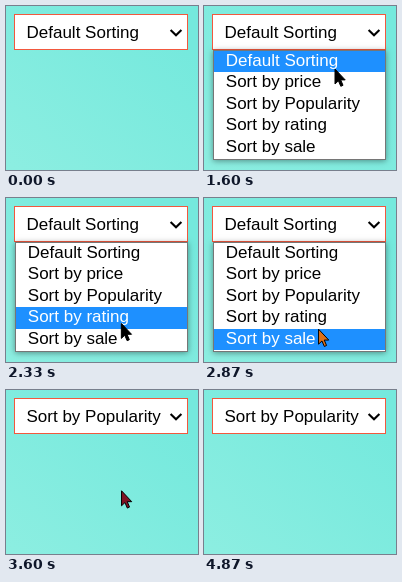
Animation of 192 by 164 pixels, one loop 4990 ms. Source, as an HTML page with a canvas:

```html
<!DOCTYPE html>
<html lang="en">
<head>
<meta charset="utf-8">
<title>Sorting select</title>
<style>
  html, body { margin: 0; width: 100%; height: 100%; overflow: hidden; }
  canvas { display: block; width: 192px; height: 164px; }
</style>
</head>
<body>
<canvas id="stage" width="192" height="164"></canvas>
<script>
const ctx = document.getElementById('stage').getContext('2d');
const LOOP = 4990, OPEN = 670, CLOSE = 3600;
const LIST_TOP = 45, ROW = 21.4;
const options = ['Default Sorting', 'Sort by price', 'Sort by Popularity', 'Sort by rating', 'Sort by sale'];
const arrow = [[0, 0], [0, 15], [3.4, 11.8], [5.8, 17.3], [8, 16.3], [5.7, 10.9], [10.2, 10.9]];

const smooth = p => p * p * (3 - 2 * p);
const easeIn = p => Math.pow(p, 1.6);
const mix = (a, b, p) => a + (b - a) * p;
const clamp = (v, lo, hi) => Math.min(hi, Math.max(lo, v));
const rowTop = i => Math.round(LIST_TOP + i * ROW);

// Pointer moves, each made in a number of visible steps
const start = { x: 190, y: 66 };
const moves = [
  { from: 70, to: 400, steps: 6, x: 170, y: 26, ease: smooth },
  { from: 1130, to: 1600, steps: 8, x: 131, y: 63, ease: smooth },
  { from: 1670, to: 2130, steps: 8, x: 115.5, y: 124, ease: smooth },
  { from: 2270, to: 2470, steps: 4, x: 114.5, y: 133, ease: smooth },
  { from: 2870, to: 3330, steps: 7, x: 115.5, y: 100, ease: smooth },
  { from: 3600, to: 4600, steps: 16, x: 119, y: 166, ease: easeIn }
];

function pointerAt(t) {
  let { x, y } = start;
  for (const m of moves) {
    if (t < m.from) break;
    const gap = (m.to - m.from) / (m.steps - 1);
    const step = Math.floor((t - m.from + 4) / gap) + 1;
    const p = m.ease(clamp(step / m.steps, 0, 1));
    x = mix(x, m.x, p);
    y = mix(y, m.y, p);
  }
  return { x, y };
}

function pointerColor(t) {
  if (t < 2870) return '#000';
  const p = clamp((t - 2870) / 460, 0, 1);
  const from = [222, 112, 24], to = [128, 20, 36];
  return `rgb(${from.map((v, i) => Math.round(mix(v, to[i], p)))})`;
}

function rect(x, y, w, h, color) {
  ctx.fillStyle = color;
  ctx.fillRect(x, y, w, h);
}

function label(text, x, y, color) {
  ctx.font = '17px "Liberation Sans", Arial, sans-serif';
  ctx.fillStyle = color;
  ctx.fillText(text, x, y);
}

function trace(points) {
  ctx.beginPath();
  points.forEach(([x, y]) => ctx.lineTo(x, y));
}

function drawBackground() {
  const g = ctx.createLinearGradient(10, 164, 150, 10);
  g.addColorStop(0, '#8ceee1');
  g.addColorStop(1, '#75e9dd');
  rect(0, 0, 192, 164, g);
}

function drawSelect(text) {
  rect(8, 8, 174, 36, '#f2583e');
  rect(9, 9, 172, 34, '#fff');
  label(text, 20.5, 32, '#000');
  trace([[164.6, 23.9], [170, 29.3], [175.4, 23.9]]);
  ctx.strokeStyle = '#000';
  ctx.lineWidth = 2.1;
  ctx.stroke();
}

function drawList(active) {
  ctx.save();
  ctx.shadowColor = 'rgba(0,0,0,0.4)';
  ctx.shadowBlur = 6;
  ctx.shadowOffsetY = 1;
  rect(9, 44, 173, 110, '#767676');
  ctx.restore();
  rect(10, 45, 171, 108, '#fff');
  options.forEach((text, i) => {
    const top = rowTop(i);
    if (i === active) rect(10, top, 171, rowTop(i + 1) - top, '#1e90ff');
    label(text, 21.8, top + 15, i === active ? '#fff' : '#000');
  });
}

function drawPointer({ x, y }, color) {
  ctx.save();
  ctx.translate(x, y);
  trace(arrow);
  ctx.closePath();
  ctx.fillStyle = color;
  ctx.fill();
  ctx.strokeStyle = '#000';
  ctx.lineWidth = 1;
  ctx.lineJoin = 'round';
  ctx.stroke();
  ctx.restore();
}

function draw(now) {
  const t = now % LOOP;
  const pointer = pointerAt(t);
  drawBackground();
  drawSelect(options[t < CLOSE ? 0 : 2]);
  if (t >= OPEN && t < CLOSE) {
    drawList(clamp(Math.floor((pointer.y - LIST_TOP) / ROW), 0, options.length - 1));
  }
  if (t >= 70 && t < 4600) drawPointer(pointer, pointerColor(t));
}

const begin = performance.now();
function tick() {
  draw(performance.now() - begin);
  requestAnimationFrame(tick);
}
tick();
</script>
</body>
</html>
```
